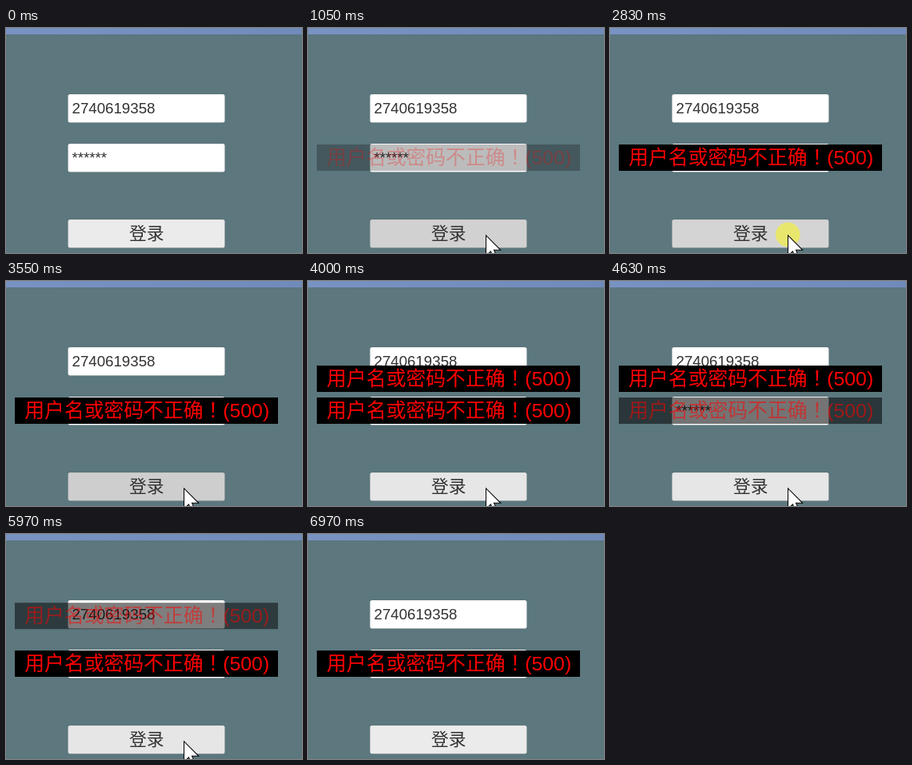
These frames come from a looping animation (370 by 282 pixels, 7.35 s). An HTML page with a canvas:

```html
<!DOCTYPE html>
<html lang="zh-CN">
<head>
<meta charset="utf-8">
<title>登录</title>
<style>
html, body { margin: 0; width: 100%; height: 100%; overflow: hidden; background: #5c777e; }
canvas { display: block; }
</style>
</head>
<body>
<canvas id="stage" width="370" height="282"></canvas>
<script>
const ctx = document.getElementById('stage').getContext('2d');
const LOOP = 7350;
const LATIN = '"Liberation Sans", Arial, sans-serif';
const SC = '"Noto Sans CJK SC", "Noto Sans CJK", sans-serif';
const JP = '"Noto Sans CJK JP", "Noto Sans CJK", sans-serif';

// Each click: mouse down, then the reply that shows a message.
const clicks = [
  { down: 930, reply: 985 },
  { down: 1630, reply: 1882 },
  { down: 2770, reply: 2950 },
  { down: 3440, reply: 3710 },
  { down: 4390, reply: 4495 },
  { down: 5220, reply: 5310 },
  { down: 6010, reply: 6170 }
];
const HOLD = 90, TINT = 100;
const LIFE = 1300, FADE_IN = 250, FADE_OUT = 355;
const LOW = 146, HIGH = 106, RISE = 40;

const ramp = (t, from, len) => Math.max(0, Math.min(1, (t - from) / len));
const mix = (a, b, k) => a + (b - a) * k;

function text(str, x, y, size, color, family) {
  ctx.font = `${size}px ${family}`;
  ctx.fillStyle = color;
  ctx.fillText(str, x, y);
  return x + ctx.measureText(str).width;
}

function panel(y, color) {
  ctx.beginPath();
  ctx.roundRect(77.5, y, 196, 35.5, 2.5);
  ctx.fillStyle = color;
  ctx.fill();
  ctx.strokeStyle = 'rgba(60,60,60,0.14)';
  ctx.lineWidth = 0.7;
  ctx.stroke();
}

function buttonColor(t) {
  const hover = ramp(t, 470, TINT) * (1 - ramp(t, 6830, TINT));
  let gray = mix(235, 230, hover);
  for (const { down } of clicks)
    gray = mix(gray, 200, ramp(t, down, TINT) * (1 - ramp(t, down + HOLD, TINT)));
  gray = Math.round(gray);
  return `rgb(${gray},${gray},${gray})`;
}

// A message stays low until the next one pushes it up, then floats away.
function drawToast(t, { reply }, next) {
  const leave = next ? reply + LIFE : Infinity;
  if (t < reply || t >= leave + FADE_OUT) return;
  const out = ramp(t, leave, FADE_OUT);
  const y = next && t >= next.reply ? HIGH - RISE * out : LOW;
  const base = y + 24.6, size = 24.8;
  ctx.globalAlpha = ramp(t, reply, FADE_IN) * (1 - out);
  ctx.fillStyle = '#000';
  ctx.fillRect(11, y, 329, 33);
  let x = text('用户名或密码不正确', 23.3, base, size, '#f00', SC);
  x = text('！', x, base, size, '#f00', JP);
  text('(500)', x, base, size, '#f00', LATIN);
  ctx.globalAlpha = 1;
}

function drawCursor(t) {
  if (t < 200 || t >= 6960) return;
  const y = 260 + 15 * (1 - ramp(t, 200, 150)) + 24 * ramp(t, 6780, 170);
  if (clicks.some(({ down }) => t >= down && t < down + HOLD)) {
    ctx.beginPath();
    ctx.arc(222.3, y - 1, 15.3, 0, Math.PI * 2);
    ctx.fillStyle = 'rgba(238,234,88,0.82)';
    ctx.fill();
  }
  ctx.save();
  ctx.translate(222.5, y);
  ctx.scale(1.55, 1.55);
  ctx.fillStyle = '#fff';
  ctx.strokeStyle = '#000';
  ctx.lineWidth = 0.65;
  const arrow = new Path2D('M0 0V16.5L3.8 12.8L6.4 18.6L8.9 17.5L6.4 11.8H11.8Z');
  ctx.fill(arrow);
  ctx.stroke(arrow);
  ctx.restore();
}

function draw(t) {
  ctx.fillStyle = '#5c777e';
  ctx.fillRect(0, 0, 370, 282);
  const sky = ctx.createLinearGradient(0, 0, 370, 0);
  sky.addColorStop(0, '#7893c2');
  sky.addColorStop(1, '#708bba');
  ctx.fillStyle = sky;
  ctx.fillRect(0, 0, 370, 8);

  panel(83, '#fff');
  panel(145, '#fff');
  panel(240, buttonColor(t));

  text('2740619358', 82.5, 107.2, 18.7, '#323232', LATIN);
  text('******', 82.5, 169.2, 18.7, '#323232', LATIN);
  text('登录', 154, 264.7, 21.8, '#323232', SC);

  clicks.forEach((click, i) => drawToast(t, click, clicks[i + 1]));
  drawCursor(t);
}

const start = performance.now();
function frame() {
  draw((performance.now() - start) % LOOP);
  requestAnimationFrame(frame);
}
frame();
</script>
</body>
</html>
```
